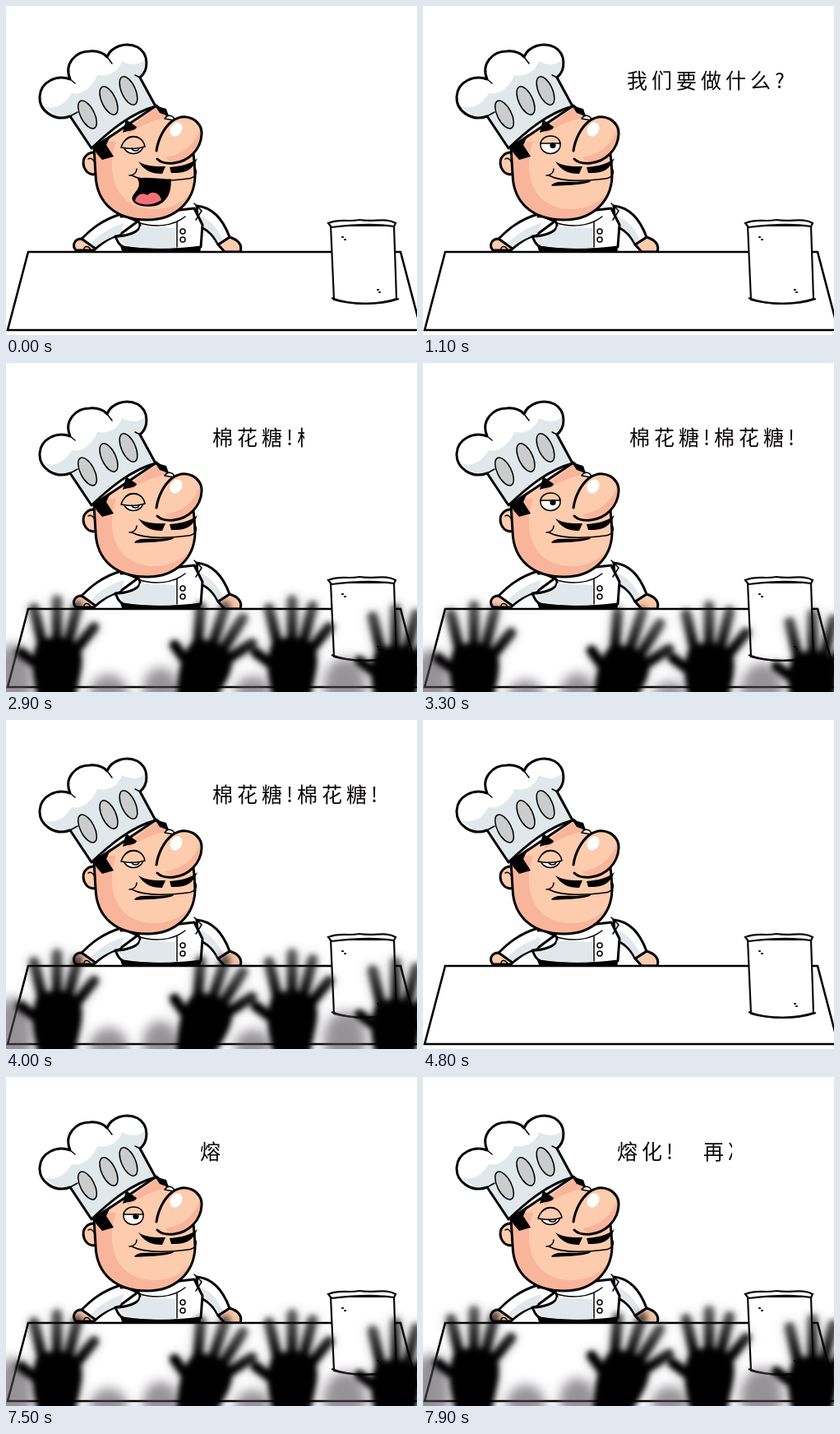
Recreate the animation shown at these times as an HTML page. Size 500x400 px, loop 8000 ms.

```html
<!DOCTYPE html>
<html lang="zh">
<head>
<meta charset="utf-8">
<style>
  html, body { margin: 0; width: 100%; height: 100%; overflow: hidden; background: #fff; }
  svg { display: block; width: 500px; height: 400px; }
  text { font: 300 25px "Noto Sans CJK SC", "Noto Sans CJK", sans-serif; letter-spacing: 5px; white-space: pre; fill: #0c0808; }
  .ink { stroke: #000; stroke-width: 3; stroke-linejoin: round; stroke-linecap: round; }
  .thin { stroke: #000; stroke-width: 1.5; stroke-linecap: round; stroke-linejoin: round; }
  .line { fill: none; }
  .skin { fill: #fdcbad; }
  .blush { fill: #f8b59b; }
  .white { fill: #fff; }
  .shade { fill: #e0e8eb; }
</style>
</head>
<body>
<svg viewBox="0 0 500 400">
  <defs>
    <filter id="soft" x="-40%" y="-40%" width="180%" height="180%"><feGaussianBlur stdDeviation="3.2"/></filter>
    <filter id="haze" x="-60%" y="-60%" width="220%" height="220%"><feGaussianBlur stdDeviation="7"/></filter>
    <linearGradient id="fade" gradientUnits="userSpaceOnUse" x1="0" y1="-76" x2="0" y2="-15">
      <stop offset="0" stop-opacity=".5"/><stop offset="1"/>
    </linearGradient>
    <g id="hand" stroke-linecap="round" stroke-linejoin="round">
      <path stroke="none" d="M-24-18C-10-28 18-28 28-12C34 10 26 24 20 60H-22C-24 34-36 14-24-18Z"/>
      <path class="line" stroke-width="12" d="M-16-10L-28-60M0-14L0-70M12-12L25-63M18-4L45-37M-14 16L-44-6"/>
    </g>
    <g id="crowd">
      <use href="#hand" x="62" y="354"/>
      <use href="#hand" transform="translate(245 358) rotate(18)"/>
      <use href="#hand" x="348" y="354"/>
      <use href="#hand" x="474" y="364"/>
    </g>
    <clipPath id="face"><path id="faceShape" d="M107 172L183 121L200 136C232 150 229 195 230 207C229 238 206 260 172 260C134 260 110 240 109 205Z"/></clipPath>
    <clipPath id="hat"><path id="hatShape" d="M78 134C60 141 40 128 41 110C42 92 62 83 78 89C70 70 85 55 102 55C112 54 120 58 123 62C128 49 146 43 160 50C174 58 174 78 163 87L182 122C152 130 126 152 104 173Z"/></clipPath>
    <clipPath id="reveal"><rect id="wipe" y="60" height="60"/></clipPath>
  </defs>

  <g id="chef">
    <!-- jacket and arms -->
    <path class="ink" d="M138 284H236L235 299H143Z"/>
    <path class="ink skin" d="M92 283C83 283 80 291 85 297H107L110 294Z"/>
    <path class="thin line" d="M95 297C94 291 101 291 103 297"/>
    <path class="ink skin" d="M272 281C282 284 288 290 285 299H266L258 290Z"/>
    <path class="ink white" d="M140 253C116 260 102 273 92 283L109 295C118 287 128 281 137 279L160 262Z"/>
    <path class="shade" d="M144 264C125 269 112 279 103 289L109 293C119 285 128 281 139 277Z"/>
    <path class="ink white" d="M232 243C254 245 265 262 272 281L258 290C252 278 245 271 234 268Z"/>
    <path class="shade" d="M236 255C252 262 259 274 264 284L258 288C252 276 244 270 236 267Z"/>
    <path class="ink white" d="M140 256C153 255 163 260 163 267C163 275 146 280 133 280C136 287 138 291 143 293C175 298 205 297 237 293L239 266L229 246Z"/>
    <path class="shade" d="M163 268C163 277 150 281 137 282L144 291C172 295 190 295 206 294V270Z"/>
    <path class="thin line" d="M160 263C180 270 203 268 218 256M208 262V293M229 240L238 249L231 260"/>
    <g class="thin white"><circle cx="215" cy="274" r="3"/><circle cx="215" cy="284" r="3"/></g>

    <!-- head -->
    <path class="ink skin" d="M114 180C101 174 91 184 95 196C99 206 109 207 114 201Z"/>
    <path class="thin line" d="M109 194C107 186 103 184 100 186"/>
    <use href="#faceShape" class="skin"/>
    <g clip-path="url(#face)">
      <path class="blush" d="M100 165H134C122 196 128 246 180 247C208 247 223 232 231 216V265H100Z"/>
      <path class="blush" d="M148 150L190 118L203 134C180 138 165 144 148 157Z"/>
    </g>
    <use href="#faceShape" class="ink line"/>
    <path d="M106 171L128 156L122 169L131 183L117 187L110 179Z"/>
    <path d="M181 121L195 125L198 134L187 130Z"/>
    <path class="thin white" d="M193 137C197 131 204 133 205 139Z"/>

    <!-- toque -->
    <use href="#hatShape" class="white"/>
    <g clip-path="url(#hat)">
      <path class="shade" d="M44 121C60 128 72 119 80 106C92 109 106 98 111 84C129 87 139 75 141 67C153 73 163 72 170 64L190 122L104 180L74 142Z"/>
    </g>
    <use href="#hatShape" class="ink line"/>
    <path class="thin line" d="M78 89L84 94M123 62L129 70M163 87L157 84M78 134L87 129"/>
    <g class="thin" fill="#cbcdcd">
      <ellipse rx="8.5" ry="18.5" transform="translate(99 132) rotate(-27)"/>
      <ellipse rx="8.5" ry="18.5" transform="translate(125 115) rotate(-25)"/>
      <ellipse rx="8.5" ry="18.5" transform="translate(149 103) rotate(-24)"/>
    </g>

    <!-- eye -->
    <path d="M142 154L146 138L159 147C158 152 150 151 142 154Z"/>
    <ellipse class="thin white" cx="155" cy="169" rx="12" ry="10.5"/>
    <g id="openEye">
      <path class="thin skin" d="M143 167C145 155 166 155 167 167Z"/>
      <circle cx="158" cy="169.500" r="3.600"/>
    </g>
    <g id="lid">
      <path class="thin skin" d="M140 172C145 155 166 155 169 171C160 174 150 174 140 172Z"/>
      <path class="thin line" d="M153 173C154 177 161 177 162 173"/>
    </g>

    <!-- nose and moustache -->
    <path class="skin" d="M183 178C185 162 192 148 202 140C219 128 239 139 238 156C237 175 222 189 204 191C192 192 184 187 183 178Z"/>
    <path class="blush" d="M236 149C230 169 214 181 194 184C198 190 206 190 212 188C228 183 240 166 236 149Z"/>
    <path class="ink line" stroke-width="2.400" d="M183 176C185 162 192 148 202 140C219 128 239 139 238 156C237 175 222 189 204 191C195 192 188 190 184 186"/>
    <ellipse class="white" rx="7" ry="9" transform="translate(207 150) rotate(30)"/>
    <path d="M161 189C170 195 181 195 194 195L190 204C177 204 168 200 161 189Z"/>
    <path d="M199 196C213 195 225 192 233 185C227 199 219 204 201 203Z"/>
    <path class="thin line" stroke-width="2" d="M229 196C234 202 231 209 221 210C196 213 168 214 153 206M150 206C156 206 159 202 159 198"/>
    <path id="shut" class="thin" d="M157 218C164 211 177 217 203 213C190 218 172 217 157 218Z"/>
    <g id="open">
      <path class="thin" d="M161 210C175 208 188 212 200 211C201 231 191 244 173 243C157 243 150 236 157 228C163 222 164 216 161 210Z"/>
      <path fill="#f27079" d="M157 237C159 229 166 226 172 230C178 223 188 228 189 236C179 243 164 243 157 237Z"/>
    </g>
  </g>

  <path class="white" stroke="#000" stroke-width="2.600" d="M27 299H480L505 394H2Z"/>

  <!-- jar -->
  <g class="white" stroke="#0c080c" stroke-width="2.200">
    <path d="M395 267L399 357C422 364 454 363 475 356L472 267Z"/>
    <path d="M392 264C407 258 414 263 430 260C448 263 462 257 474 264L472 268C447 264 420 266 396 269Z"/>
    <path class="line" d="M396 355C420 364 455 364 478 356"/>
    <path class="line" stroke-linecap="round" d="M409 281h1M412 284h1M452 345h1M454 348h1"/>
  </g>

  <g id="hands">
    <g fill="#514c55" filter="url(#haze)" opacity=".6">
      <ellipse cx="8" cy="385" rx="24" ry="48"/><ellipse cx="125" cy="400" rx="24" ry="26"/>
      <ellipse cx="188" cy="394" rx="22" ry="28"/><ellipse cx="300" cy="398" rx="22" ry="22"/>
      <ellipse cx="412" cy="390" rx="26" ry="36"/>
    </g>
    <use href="#crowd" fill="#444" stroke="#444" filter="url(#haze)" opacity=".45"/>
    <use href="#crowd" fill="url(#fade)" stroke="url(#fade)" filter="url(#soft)"/>
  </g>

  <text id="speech" y="100" clip-path="url(#reveal)"></text>
</svg>

<script>
const LOOP = 8000, STEP = 100;
// start, end: when the line is on screen; speed: pixels written per step
const lines = [
  { start: 400, end: 2500, x: 248, speed: 28, text: "我们要做什么?" },
  { start: 2600, end: 4800, x: 251, speed: 28, text: "棉花糖!棉花糖!" },
  { start: 5100, end: 7400, x: 286, speed: 13, text: "怎么做?" },
  { start: 7500, end: 8000, x: 236, speed: 28, text: "熔化!   再冷却!" }
];
const el = id => document.getElementById(id);
const show = (id, on) => el(id).style.display = on ? "" : "none";
const within = (t, from, to) => t >= from && t < to;

function draw(now) {
  const t = Math.floor(now % LOOP / STEP) * STEP;

  const speaking = within(t, 0, 1100) || within(t, 5000, 5800);
  const mouthOpen = speaking && t % 400 < 200;

  const crowdStart = t >= 7400 ? 7400 : 2500;
  const crowd = within(t, 2500, 4800) || t >= 7400;
  const wave = (t >= 7400 ? t : Math.min(t, 4200)) - crowdStart;
  const blink = [1800, 4800, 6600].some(b => within(t, b, b + 200));
  const drowsy = crowd && within(wave % 1000, 400, 600);
  const lidded = mouthOpen || blink || drowsy;

  show("open", mouthOpen);
  show("shut", !mouthOpen);
  show("lid", lidded);
  show("openEye", !lidded);

  show("hands", crowd);
  const drop = 6 - 6 * Math.cos(wave / 500 * 2 * Math.PI);
  el("hands").setAttribute("transform", `translate(0 ${drop.toFixed(2)})`);

  const line = lines.find(l => within(t, l.start, l.end));
  show("speech", line);
  if (line) {
    el("speech").textContent = line.text;
    el("speech").setAttribute("x", line.x);
    el("wipe").setAttribute("x", line.x);
    el("wipe").setAttribute("width", line.speed * ((t - line.start) / STEP + 1));
  }
  requestAnimationFrame(draw);
}
requestAnimationFrame(draw);
</script>
</body>
</html>
```
